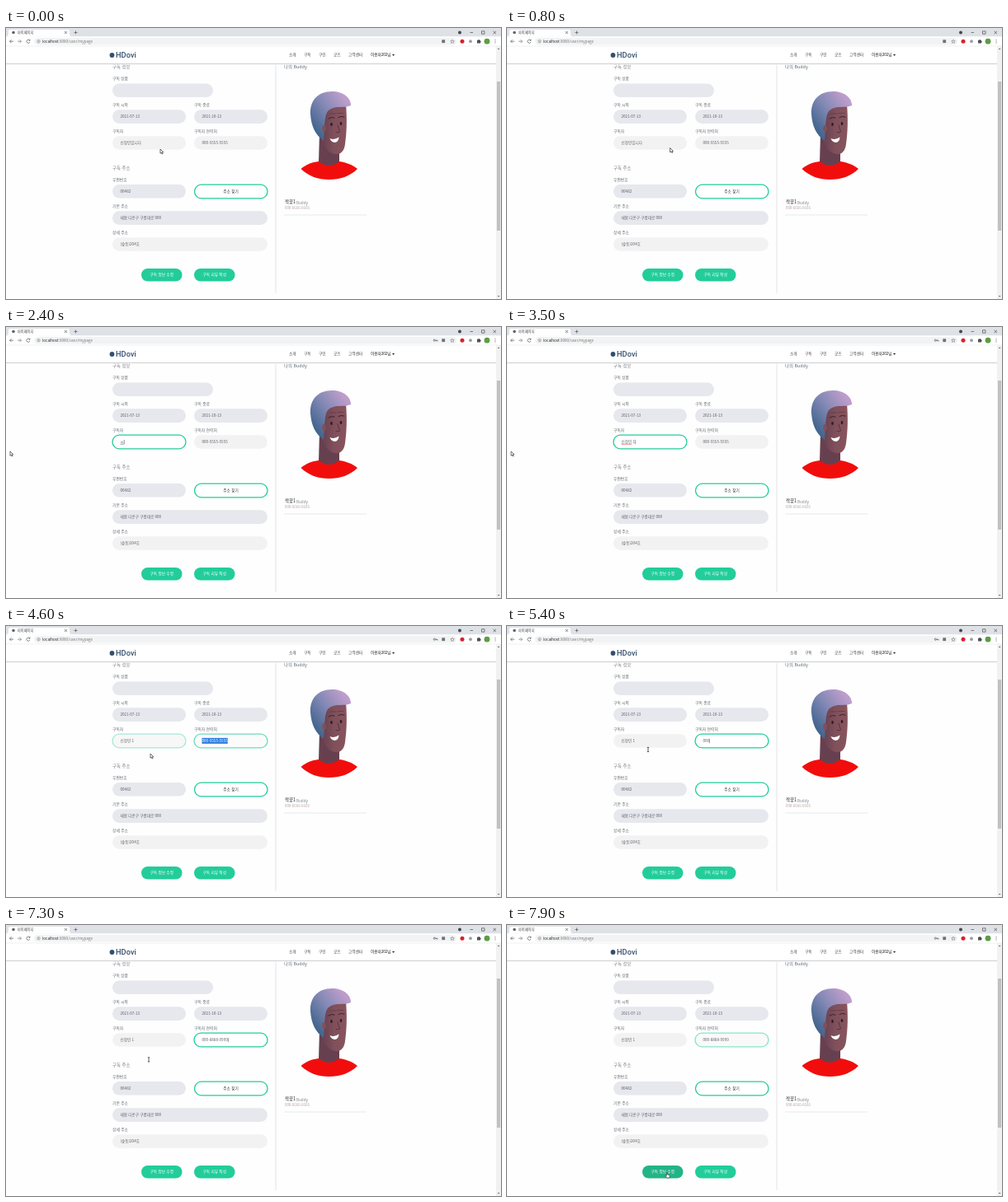
An HTML page for the animation above (8 s loop, 600x329 px).

```html
<!DOCTYPE html>
<html lang="ko">
<head>
<meta charset="utf-8">
<title>마이페이지</title>
<style>
html, body { margin: 0; width: 100%; height: 100%; overflow: hidden; background: #fff; }
svg { display: block; width: 100%; height: 100%; }
text { font-family: "Noto Sans CJK KR", "Noto Sans CJK", "Noto Sans", sans-serif; white-space: pre; }
</style>
</head>
<body>
<svg id="stage" viewBox="0 0 600 329">
  <defs>
    <linearGradient id="hair" x1=".15" y1=".8" x2=".85" y2=".15">
      <stop offset="0" stop-color="#43668f"/><stop offset=".5" stop-color="#8288b4"/><stop offset="1" stop-color="#bd9dcb"/>
    </linearGradient>
    <linearGradient id="skin" x1="0" x2="1">
      <stop offset="0" stop-color="#67404f"/><stop offset=".5" stop-color="#80505b"/><stop offset="1" stop-color="#88545d"/>
    </linearGradient>
    <linearGradient id="shade" x1="0" y1="0" x2="0" y2="1">
      <stop offset="0" stop-color="#bbb"/><stop offset="1" stop-color="#fff"/>
    </linearGradient>
  </defs>
  <rect width="600" height="329" fill="#fefefe"/>
  <g id="page"></g>
  <g id="portrait">
    <path d="M380 128L379 163Q386 171 397 170Q404 167 404 162V146Z" fill="#67404f"/>
    <path d="M357.500 171C364 165.500 371 163 379 162Q391 172 404 162C413 163.500 420 166 426 171C417 180 405 184 391.500 184C378 184 367 180 357.500 171Z" fill="#f20d0d"/>
    <path d="M385 96L412 93C413.500 110 413 127 411 141C410 150 405 154 399 153C391 152 386 145 383 136Z" fill="url(#skin)"/>
    <path d="M418 98C420 85 409 77 395 77C378 77 368 88 369 105C370 119 375 130 385 137L386 119C387 110 387 104 391 100C399 93 411 98 418 94Z" fill="url(#hair)"/>
    <ellipse cx="385.500" cy="122" rx="2.400" ry="4" fill="#80505b"/>
    <g fill="none" stroke="#39232f" stroke-linecap="round">
      <path d="M391 110Q394 107.500 398 109M403 108.500Q406 106.500 410 108" stroke-width="1"/>
      <path d="M393 104H400M402 103.500H409" stroke-width=".4"/>
      <path d="M402 118L404.500 126Q402.500 127.500 400 126.500" stroke-width=".6"/>
    </g>
    <g fill="#2c1b27"><ellipse cx="394.500" cy="117" rx="1.300" ry="1.900"/><ellipse cx="406" cy="116" rx="1.300" ry="1.900"/></g>
    <path d="M392.500 134Q398 136.500 403.500 132.500Q403 139 398.500 139Q394 138.500 392.500 134Z" fill="#fff"/>
  </g>
  <g id="chrome"></g>
  <g id="cursor">
    <path id="arrow" d="M0 0V5.300L1.300 4.200L2.200 6L3.100 5.600L2.300 3.800H3.800Z" fill="#fff" stroke="#222" stroke-width=".65"/>
    <path id="ibeam" d="M-1.200 -2.600H1.200M0 -2.600V2.600M-1.200 2.600H1.200" fill="none" stroke="#222" stroke-width=".7"/>
    <path id="hand" d="M-.6 -.4Q0 -1 .6 -.4V2L3 2.600Q3.500 3 3.300 4L2.700 6H-.3L-2 3.600Q-1.600 2.700 -.6 3.400Z" fill="#fff" stroke="#222" stroke-width=".6"/>
  </g>
</svg>
<script>
const $ = id => document.getElementById(id);
const LOOP = 8000, GREEN = '#22cd9a', IDLE = '#f2f2f2', LOCKED = '#e7e8ed', INK = '#5d6068';
let layer = $('page');

function add(tag, attrs, content) {
  const node = document.createElementNS('http://www.w3.org/2000/svg', tag);
  set(node, attrs);
  if (content !== undefined) node.textContent = content;
  return layer.appendChild(node);
}
function set(node, attrs) {
  for (const key in attrs) node.setAttribute(key, attrs[key]);
}
const rect = (x, y, width, height, fill, extra) => add('rect', { x, y, width, height, fill, ...extra });
const circle = (cx, cy, r, fill, extra) => add('circle', { cx, cy, r, fill, ...extra });
const stroke = (d, color = '#555', width = .7) =>
  add('path', { d, fill: 'none', stroke: color, 'stroke-width': width });
const label = (x, middle, content, size = 4.8, fill = '#666a72', extra) =>
  add('text', { x, y: middle + size * .36, 'font-size': size, fill, ...extra }, content);
const pill = (x, y, width, fill, extra) => rect(x, y, width, 16.6, fill, { rx: 8.3, ...extra });

function field(x, y, width, name, value, fill = LOCKED) {
  label(x, y - 6, name);
  const box = pill(x, y, width, fill);
  const selection = rect(x + 9.5, y + 4.7, 0, 7, '#2f7de1');
  const text = label(x + 9.5, y + 8.4, value, 4.6, INK);
  const caret = rect(0, y + 5.7, .5, 5.4, '#444', { visibility: 'hidden' });
  return { x: x + 9.5, y, box, selection, text, caret };
}
function button(x, content) {
  const box = rect(x, 292, 49.5, 15.4, GREEN, { rx: 7.7 });
  label(x + 24.7, 299.7, content, 4.7, '#fff', { 'text-anchor': 'middle' });
  return box;
}

// Form and side panel
label(129, 47.5, '구독 정보', 5.4, '#777b84');
label(129, 170, '구독 주소', 5.4, '#777b84');
field(129, 67.5, 122, '구독 상품', '');
field(129, 99.3, 89, '구독 시작', '2021-07-13');
field(228, 99.3, 89, '구독 종료', '2021-10-13');
const person = field(129, 131.2, 89, '구독자', '신청인입니다', IDLE);
const phone = field(228, 131.2, 89, '구독자 연락처', '000-5555-5555', IDLE);
field(129, 190, 89, '우편번호', '00482');
pill(228.5, 190.2, 88.5, '#fff', { stroke: GREEN, 'stroke-width': 1.3 });
label(272.5, 198.5, '주소 찾기', 4.7, '#333', { 'text-anchor': 'middle', 'font-weight': 500 });
field(129, 222.3, 188, '기본 주소', '새봄 다온구 구름대로 000');
field(129, 254.2, 188, '상세 주소', '(숲동)204호', IDLE);
const submit = button(164, '구독 정보 수정');
button(228, '구독 리뷰 작성');
stroke('M327 44V322', '#dedfe2', .8);
label(337, 47.5, '나의 Buddy', 5.4, '#5b6b7c');
label(338, 211.5, '짝꿍1', 5.5, '#333');
label(352, 212, 'Buddy', 4.6, '#7d8894');
label(338, 218.7, '000-6666-6666', 4.4, '#b8a5a3');
stroke('M337 227H437', '#dcdde0', .7);

// Site header and browser window
layer = $('chrome');
rect(0, 22, 594, 21, '#fff');
rect(0, 43, 594, 1.6, 'url(#shade)');
circle(128.5, 33, 2.9, '#34506f');
label(133, 33, 'HDovi', 9.3, '#34506f', { style: 'font-family:Roboto,sans-serif', 'font-weight': 500 });
[[343, '소개'], [361, '구독'], [379, '구인'], [397, '굿즈'], [415, '고객센터']]
  .forEach(([x, name]) => label(x, 32.8, name, 4.7, '#444'));
label(442, 32.8, '이용자202님', 4.6, '#111', { 'font-weight': 500 });
add('path', { d: 'M468 32H471.200L469.600 33.800Z', fill: '#111' });

rect(0, 0, 600, 10.5, '#dee1e6');
add('path', { d: 'M1 10.500Q3 10 3 7V4Q3 2 5 2H75Q77 2 77 4V7Q77 10 79 10.500Z', fill: '#fff' });
circle(9, 5.5, 1.8, '#5f6368');
label(14, 5.5, '마이페이지', 4.2, '#444');
stroke('M71 4L74 7M74 4L71 7M84.500 3.500V7.500M82.500 5.500H86.500');
circle(550, 5.5, 2, '#44474c');
stroke('M562.500 5.500H566M576.500 3.800H580V7.200H576.500ZM590.500 3.800L594 7.200M594 3.800L590.500 7.200', '#333', .6);
rect(0, 10.5, 600, 11.5, '#fff');
stroke('M0 22H600', '#e0e1e3', .5);
rect(34, 12, 512, 8.4, '#f1f3f4', { rx: 4.2 });
stroke('M9 16.200H4.500M6.500 14.200L4.500 16.200L6.500 18.200');
stroke('M14 16.200H18.500M16.500 14.200L18.500 16.200L16.500 18.200', '#777');
stroke('M28.800 15A2.100 2.100 0 1 0 29 17M29 13.800V15.300H27.500');
circle(39.5, 16.2, 1.7, 'none', { stroke: '#666', 'stroke-width': .5 });
stroke('M39.500 15.900V17.200M39.500 15V15.400', '#666', .5);
const url = label(44, 16.2, '', 4.6, '#777');
[['localhost', '#222'], [':8080/user/mypage', '#777']].forEach(([part, fill]) => {
  layer = url;
  add('tspan', { fill }, part);
});
layer = $('chrome');
const key = stroke('M520.400 16.200H523V17.500M521.700 16.200V17.200M520.400 16.200A1.100 1.100 0 1 0 518.200 16.200A1.100 1.100 0 1 0 520.400 16.200');
rect(528.3, 14.3, 3.8, 3.8, '#6d7278');
stroke('M541 14L541.700 15.600L543.300 15.700L542 16.800L542.400 18.400L541 17.500L539.600 18.400L540 16.800L538.700 15.700L540.300 15.600Z', '#555', .45);
circle(553, 16.2, 2.5, '#d8202c');
circle(563, 16.2, 1.9, '#9a9da3');
add('path', { d: 'M571 14.800H572.300A.8 .8 0 0 1 573.900 14.800H575V16A.8 .8 0 0 1 575 17.600V18.600H571Z', fill: '#4d5156' });
circle(583, 16.2, 3.4, '#5c9d42');
[14.4, 16.2, 18].forEach(y => circle(593, y, .5, '#555'));

rect(594, 22, 6, 307, '#f1f1f1');
rect(595, 65, 4.2, 181, '#c1c1c1');
add('path', { d: 'M595.700 26L597.100 24.400L598.500 26ZM595.700 325L597.100 326.600L598.500 325Z', fill: '#666' });

// Pointer stops: time, x, y, shape
const stops = [
  [0, 187, 147, 'arrow'], [600, 187, 147, 'arrow'],
  [1100, 217, 143, 'ibeam'], [1600, 217, 143, 'ibeam'],
  [1950, 5, 151, 'arrow'], [3650, 5, 151, 'arrow'],
  [4300, 285, 140, 'ibeam'], [4430, 285, 140, 'ibeam'],
  [4600, 175, 155, 'arrow'], [5100, 175, 155, 'arrow'],
  [5400, 171, 150, 'ibeam'], [7200, 171, 150, 'ibeam'],
  [7750, 194, 301, 'hand'], [LOOP, 194, 301, 'hand']
];
const typed = [
  [2200, 'ㅅ'], [2340, '시'], [2480, '신'], [2600, '신ㅊ'], [2700, '신처'], [2800, '신청'],
  [2900, '신청ㅇ'], [3000, '신청이'], [3100, '신청인'], [3260, '신청인 '], [3400, '신청인 1']
];
layer = $('page');
const underline = stroke('', '#555', .6);

const ease = (t, from, to) => {
  const p = Math.min(1, Math.max(0, (t - from) / (to - from)));
  return p * p * (3 - 2 * p);
};
const show = (node, on) => node.setAttribute('visibility', on ? 'visible' : 'hidden');

function pointer(t) {
  const i = stops.findIndex((stop, n) => n > 0 && t < stop[0]);
  const [t0, x0, y0, before] = stops[i - 1], [t1, x1, y1, after] = stops[i];
  const p = ease(t, t0, t1);
  return { x: x0 + (x1 - x0) * p, y: y0 + (y1 - y0) * p, shape: p > .7 ? after : before };
}

// Regroups as 3-n-4 once eight digits are present.
const hyphenate = digits => digits.replace(/^(\d{3})(\d+)(\d{4})$/, '$1-$2-$3');

function edit(input, t, focus, press, typing, blur, content, mouseX) {
  const focused = ease(t, focus, focus + 230) * (1 - ease(t, blur, blur + 230));
  const grey = Math.round(242 + 13 * focused);
  set(input.box, {
    fill: `rgb(${grey},${grey},${grey})`,
    stroke: GREEN, 'stroke-width': 1.3, 'stroke-opacity': focused
  });
  input.text.textContent = content;
  const end = input.x + input.text.getComputedTextLength();
  const selecting = t >= press && t < typing;
  const start = t < press + 400 ? Math.min(end, Math.max(input.x, mouseX)) : input.x;
  const width = selecting ? end - start : 0;
  set(input.selection, { x: start, width });
  set(input.text, { fill: width > (end - input.x) / 2 ? '#fff' : INK });
  input.caret.setAttribute('x', end + .2);
  show(input.caret, t >= typing && t < blur && (t - typing) % 1060 < 800);
  return end;
}

function draw(t) {
  const mouse = pointer(t);
  const name = typed.reduce((text, [at, value]) => t >= at ? value : text, '신청인입니다');
  const nameEnd = edit(person, t, 1600, 1600, 2200, 4470, name, mouse.x);
  const count = Math.min(11, Math.floor((t - 5000) / 190) + 1);
  const number = count > 0 ? hyphenate('00088889999'.slice(0, count)) : '000-5555-5555';
  edit(phone, t, 4460, 4430, 5000, 7790, number, mouse.x);

  const composing = t >= 2200 && t < 3260;
  const misspelt = t >= 3260 && t < 4470;
  const lineEnd = misspelt ? person.x + 12.8 : nameEnd;
  const lineStart = composing ? nameEnd - 4.3 : person.x;
  set(underline, { d: `M${lineStart} 142.300H${lineEnd}`, stroke: misspelt ? '#e54545' : '#666' });
  show(underline, composing || misspelt);
  show(key, t >= 2200);

  const hover = ease(t, 7680, 7860);
  submit.setAttribute('fill', `rgb(34,${205 - 25 * hover},${154 - 20 * hover})`);
  $('cursor').setAttribute('transform', `translate(${mouse.x} ${mouse.y})`);
  ['arrow', 'ibeam', 'hand'].forEach(shape => show($(shape), shape === mouse.shape));
}

const began = performance.now();
function tick() {
  draw((performance.now() - began) % LOOP);
  requestAnimationFrame(tick);
}
tick();
</script>
</body>
</html>
```
